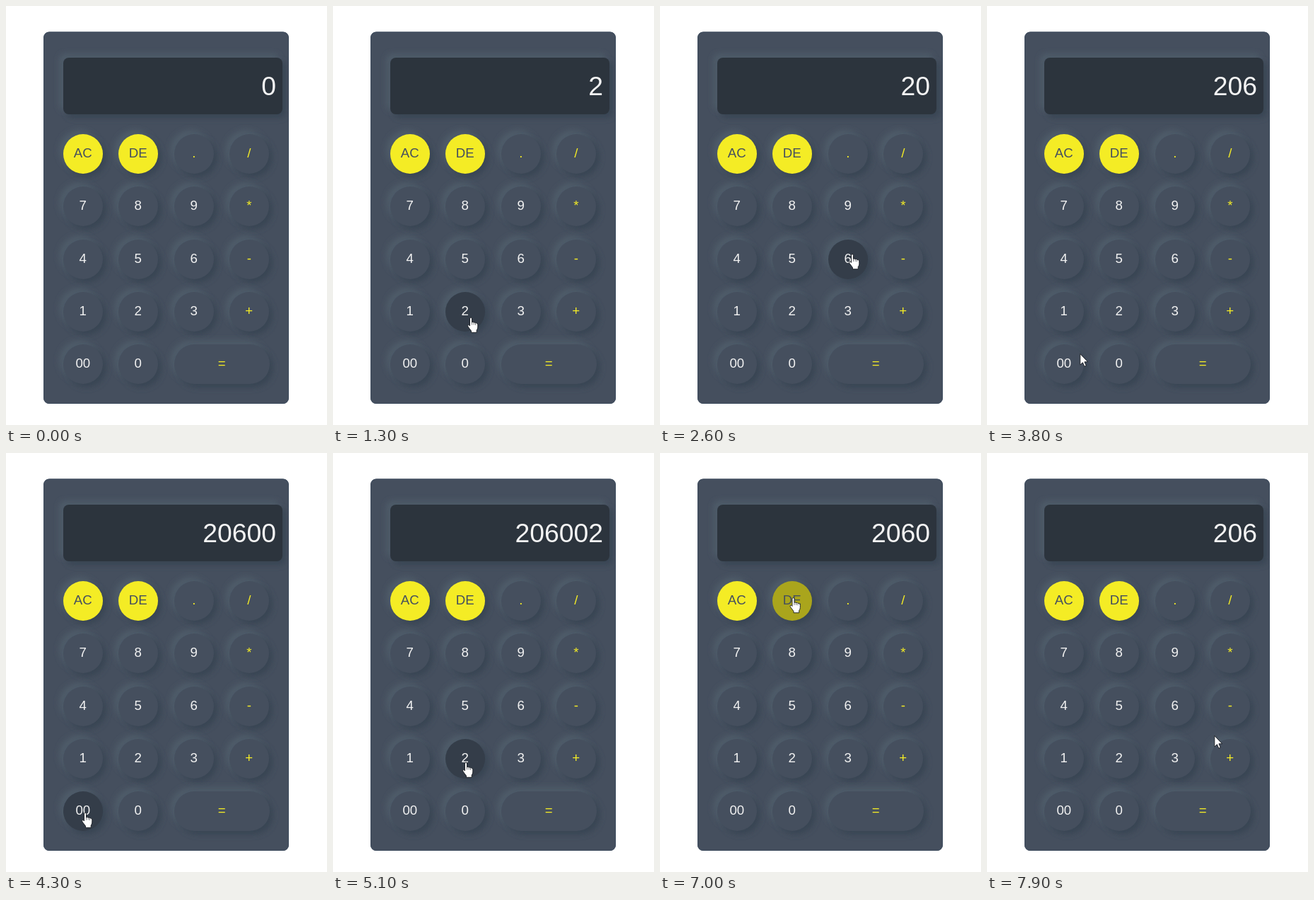
An HTML page that plays this animation: 454 by 592 pixels, repeating every 8000 ms.

```html
<!DOCTYPE html>
<html lang="en">
<head>
<meta charset="utf-8">
<title>Calculator</title>
<style>
html, body { margin: 0; width: 100%; height: 100%; overflow: hidden; background: #fff; }
svg { display: block; width: 454px; height: 592px; }
text { font-family: "Liberation Sans", Arial, sans-serif; }
#keys text { font-size: 18.67px; text-anchor: middle; }
#value { font-size: 37.33px; text-anchor: end; fill: #f4f4f4; }
</style>
</head>
<body>
<svg viewBox="0 0 454 592">
  <defs>
    <filter id="soft" x="-50%" y="-50%" width="200%" height="200%"><feGaussianBlur stdDeviation="4"/></filter>
    <clipPath id="body"><rect x="53" y="37" width="347" height="525" rx="8"/></clipPath>
  </defs>
  <rect x="53" y="36.5" width="347" height="525.5" rx="8" fill="#454f5e"/>
  <rect x="53.5" y="37" width="346" height="524.5" rx="8" fill="none" stroke="#3e4c5e"/>
  <g id="shadows" clip-path="url(#body)"></g>
  <rect x="81" y="73" width="310" height="80" rx="8" fill="#2c343d"/>
  <text id="value" x="382" y="126">0</text>
  <g id="keys"></g>
  <g id="cursor" fill="#fff" stroke="#15191f" stroke-linejoin="round">
    <path id="arrow" stroke-width=".9" d="M.5 .5V16L4.1 12.7L6.5 18.3L9 17.2L6.6 11.8H11.3Z"/>
    <g id="hand" transform="translate(-5 -.5)">
      <path stroke-width=".9" d="M3.5 2.5Q3.5.5 5 .5Q6.5.5 6.5 2.5V7.5Q7.2 6.3 9.2 7.6Q10.6 6.9 11.4 8.4Q13 7.8 13.5 9.1Q14.8 9.1 14.8 11V14.5Q14.6 17 13.2 18.6V21.8H5.5V19.6L1 13.6Q0 11.8 1.2 11.2Q2.2 10.7 3.5 12.5Z"/>
      <path fill="none" stroke-width=".6" d="M6.5 7.5V11M9.2 7.8V11M11.5 8.6V11.3"/>
    </g>
  </g>
</svg>
<script>
const NS = "http://www.w3.org/2000/svg";
const $ = id => document.getElementById(id);
const LOOP = 8000, STEP = 100;
const FACE = "#454f5e", YELLOW = "#f4ec25";

function add(parent, tag, attrs) {
  const el = document.createElementNS(NS, tag);
  for (const k in attrs) el.setAttribute(k, attrs[k]);
  parent.appendChild(el);
  return el;
}

function shadow(x, y, width, height, rx) {
  const cast = (d, fill) => add($("shadows"), "rect",
    { x: x + d, y: y + d, width, height, rx, fill, filter: "url(#soft)" });
  cast(-5, "#4f5d6a");
  cast(5, "#394552");
}

const rows = [
  ["AC", "DE", ".", "/"],
  ["7", "8", "9", "*"],
  ["4", "5", "6", "-"],
  ["1", "2", "3", "+"],
  ["00", "0", "="]
];

const keys = [];
shadow(81, 73, 310, 80, 8);
rows.forEach((row, r) => row.forEach((label, c) => {
  const x = Math.round(80.8 + c * 78.4), y = Math.round(180.8 + r * 74.35);
  const w = label === "=" ? 135 : 56;
  const solid = label.length === 2 && r === 0;
  const color = solid ? YELLOW : FACE;
  shadow(x, y, w, 56, 28);
  const face = add($("keys"), "rect", { x, y, width: w, height: 56, rx: 28 });
  const ink = solid ? FACE : /\d/.test(label) ? "#f2f2f2" : YELLOW;
  add($("keys"), "text", { x: x + w / 2 - .2, y: y + 33.3, fill: ink }).textContent = label;
  keys.push({ face, x, y, w, color, dark: solid ? "#aaa51c" : "#343d49" });
}));

// Pointer glides: start, end, destination x, y
const glides = [
  [100, 100, 226, 488],
  [100, 400, 299, 315],
  [700, 900, 226, 392],
  [900, 1100, 194, 440],
  [1300, 1300, 195, 440],
  [1700, 2000, 190, 509],
  [2300, 2600, 272, 350.5],
  [3300, 3300, 267, 351],
  [3800, 3800, 131.3, 491],
  [3800, 4200, 112, 508],
  [4600, 5000, 188, 437],
  [5300, 6000, 188.5, 204.5],
  [7900, 7900, 321.3, 399]
];

const readings = [
  [0, "0"], [1300, "2"], [2100, "20"], [2800, "206"], [4300, "20600"],
  [5100, "206002"], [6300, "20600"], [7000, "2060"], [7800, "206"]
];

const ease = p => p * p * (3 - 2 * p);

function pointer(t) {
  let x = 0, y = 0;
  for (const [from, to, gx, gy] of glides) {
    if (t < from) break;
    const p = to > from ? ease(Math.min(1, (t - from) / (to - from))) : 1;
    x += (gx - x) * p;
    y += (gy - y) * p;
  }
  return { x, y };
}

function inside(k, x, y) {
  const mid = Math.max(k.x + 28, Math.min(k.x + k.w - 28, x));
  return Math.hypot(x - mid, y - k.y - 28) < 26.5;
}

function draw(time) {
  const t = Math.floor((time % LOOP) / STEP) * STEP;
  const { x, y } = pointer(t);
  const shown = t >= glides[0][0];
  let over = false;
  for (const k of keys) {
    const hit = shown && inside(k, x, y);
    over = over || hit;
    k.face.setAttribute("fill", hit ? k.dark : k.color);
  }
  $("cursor").setAttribute("transform", `translate(${x} ${y})`);
  $("cursor").setAttribute("display", shown ? "inline" : "none");
  $("hand").setAttribute("display", over ? "inline" : "none");
  $("arrow").setAttribute("display", over ? "none" : "inline");
  $("value").textContent = readings.filter(r => r[0] <= t).pop()[1];
}

const start = performance.now();
function tick() {
  draw(performance.now() - start);
  requestAnimationFrame(tick);
}
tick();
</script>
</body>
</html>
```
